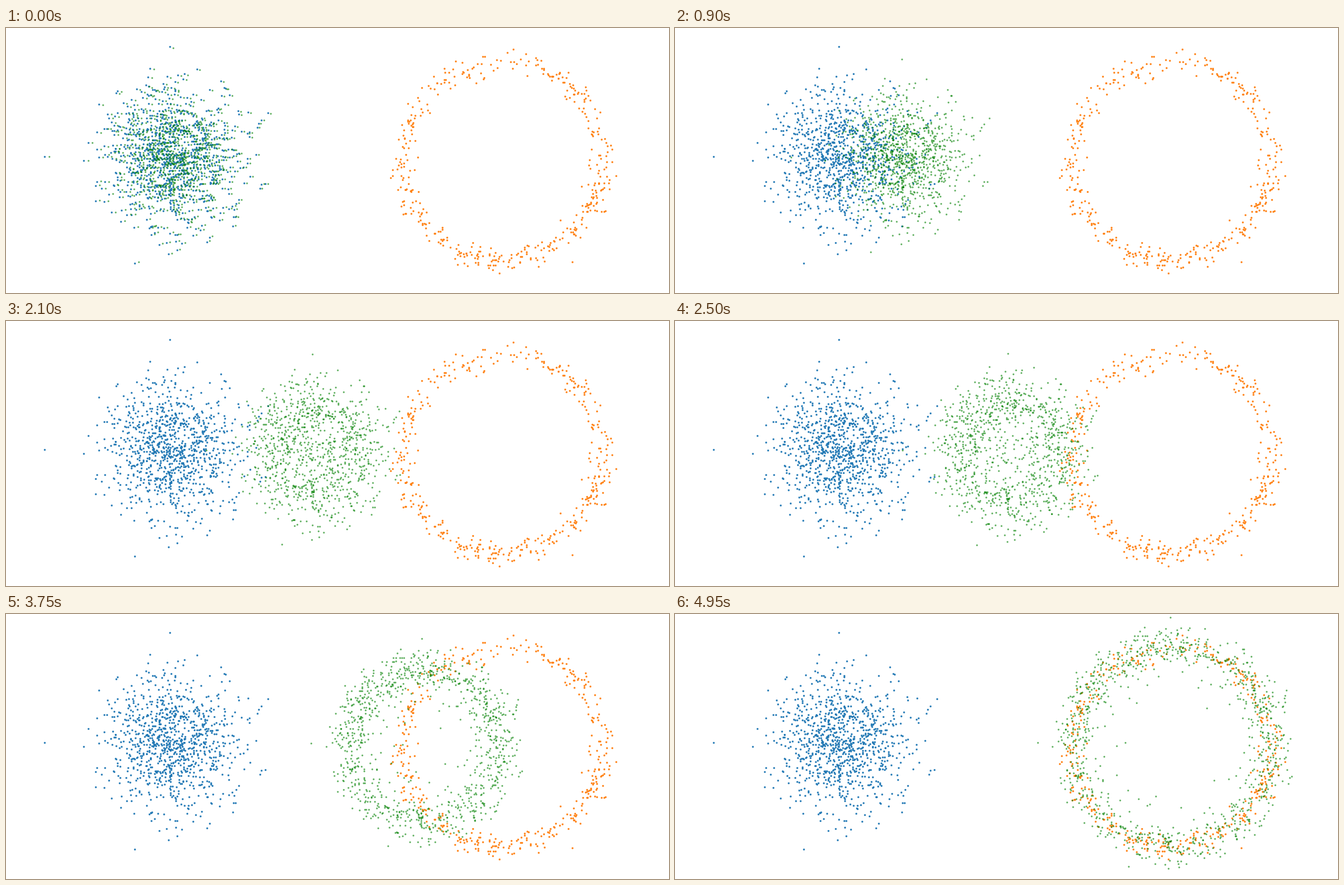
Animation, 1000 px wide and 400 px high, one loop 5000 ms. Source, as a matplotlib script:

```python
import numpy as np
import matplotlib.pyplot as plt
from matplotlib.animation import FuncAnimation

WIDTH, HEIGHT, DPI = 1000, 400, 100
FRAMES, INTERVAL = 100, 50
UNIT = 50                                  # pixels per data unit
START, END = np.array([250, 200]), np.array([750, 200])
RADIUS, SPREAD = 3.0, 0.33                 # ring the moving points flow to
CENTRE_SLOPE = 1.25
OUTLIERS = [(-3.84, -0.12), (-0.06, -3.44), (2.9, -1.44), (-1.12, 3.1)]

rng = np.random.default_rng(7)


def gaussian_cloud(count, limit=3.0):
    cloud = rng.normal(size=(2 * count, 2))
    cloud = cloud[np.hypot(*cloud.T) < limit][:count - len(OUTLIERS)]
    return np.vstack([OUTLIERS, cloud])


def noisy_ring(count, noise):
    angle = rng.uniform(0, 2 * np.pi, count)
    ring = RADIUS * np.column_stack([np.cos(angle), np.sin(angle)])
    return ring + rng.normal(scale=noise, size=ring.shape)


def mean_cosine(k):
    """Mean cosine of a von Mises distribution with concentration k."""
    cosine = np.cos((np.arange(80) + 0.5) * np.pi / 80)
    weight = np.exp(k[:, None] * (cosine - 1))
    return weight @ cosine / weight.sum(axis=1)


def radial_speed(r, t):
    variance = (1 - t) ** 2 + (t * SPREAD) ** 2
    pull = (t * SPREAD ** 2 - (1 - t)) / variance
    # The cap keeps the field smooth at the centre, so a few points lag.
    aim = np.minimum(mean_cosine(t * RADIUS * r / variance), CENTRE_SLOPE * r)
    return RADIUS * aim + pull * (r - t * RADIUS * aim)


def flow_radii(r):
    radii = []
    for step in range(FRAMES):
        r = r + radial_speed(r, step / FRAMES) / FRAMES
        radii.append(r)
    return radii


source = gaussian_cloud(1000)
target = noisy_ring(430, 0.18)
start_radius = np.hypot(*source.T)
direction = source / start_radius[:, None]
radii = flow_radii(start_radius)


def positions(frame):
    t = (frame + 1) / FRAMES
    centre = START + t * (END - START)
    return centre + UNIT * radii[frame][:, None] * direction


fig = plt.figure(figsize=(WIDTH / DPI, HEIGHT / DPI), dpi=DPI, facecolor="white")
ax = fig.add_axes([0, 0, 1, 1])
ax.set(xlim=(0, WIDTH), ylim=(HEIGHT, 0))
ax.axis("off")


def dots(points, diameter, color, **style):
    size = (diameter * 72 / DPI) ** 2
    return ax.scatter(*points.T, s=size, c=color, linewidths=0, **style)


dots(START + UNIT * source, 2.8, "tab:blue", zorder=1)
dots(END + UNIT * target, 2.8, "tab:orange", zorder=2)
moving = dots(positions(0), 2.5, "green", alpha=0.7, zorder=3)


def update(frame):
    moving.set_offsets(positions(frame))
    return (moving,)


anim = FuncAnimation(fig, update, frames=FRAMES, interval=INTERVAL,
                     repeat=True, repeat_delay=0, blit=False)
plt.show()
```
